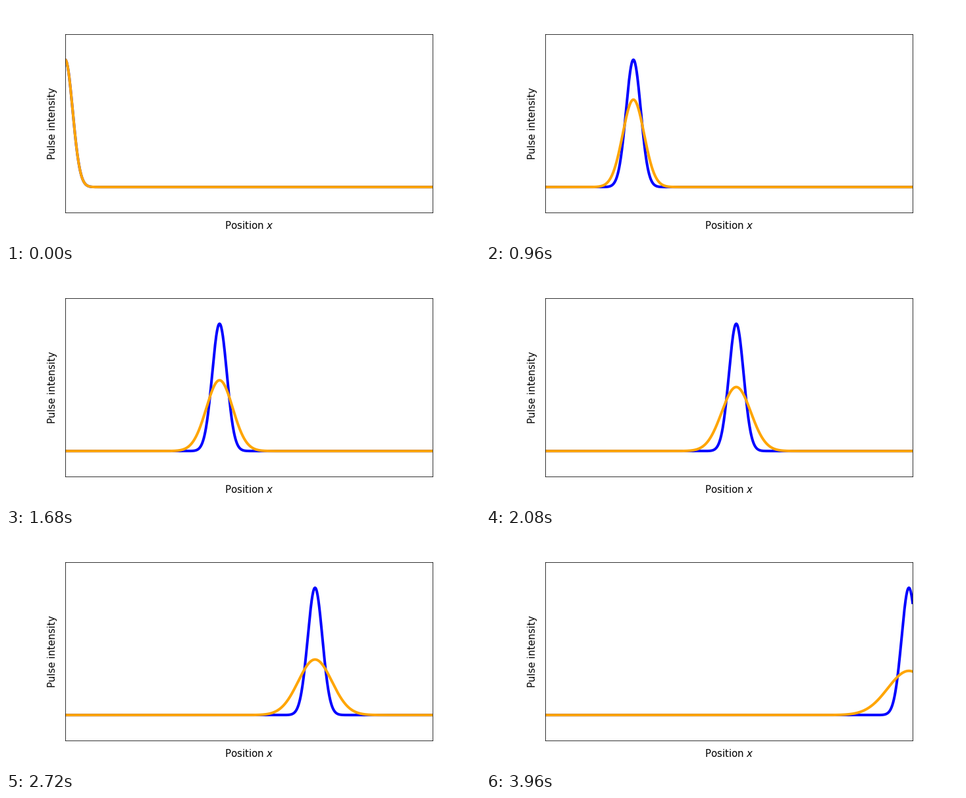
Animation of 720 by 360 pixels, one loop 4 s. Source, as a matplotlib script:

```python
import numpy as np
import matplotlib.pyplot as plt
from matplotlib.animation import FuncAnimation

FRAMES = 100
WIDTH = 2.0      # pulse width, in steps travelled per frame
SPREAD = 0.019   # relative broadening per frame

plt.rcParams["font.family"] = "DejaVu Sans"

fig, ax = plt.subplots(figsize=(10, 5), dpi=72)
fig.subplots_adjust(left=0.125, right=0.9, bottom=0.125, top=0.88)
ax.set_xlim(0, FRAMES)
ax.set_ylim(-0.2, 1.2)
ax.set_xticks([])
ax.set_yticks([])
ax.set_xlabel("Position $x$", fontsize=15, labelpad=12)
ax.set_ylabel("Pulse intensity", fontsize=15, labelpad=12)

x = np.linspace(0, FRAMES, 1001)
steady, = ax.plot([], [], color="blue", lw=4)
dispersed, = ax.plot([], [], color="orange", lw=4)


def pulse(center, stretch):
    """Gaussian of constant area, widened by the factor stretch."""
    return np.exp(-0.5 * ((x - center) / (WIDTH * stretch)) ** 2) / stretch


def update(i):
    steady.set_data(x, pulse(i, 1))
    dispersed.set_data(x, pulse(i, 1 + SPREAD * i))
    return steady, dispersed


anim = FuncAnimation(fig, update, frames=FRAMES, interval=40,
                     repeat=True, repeat_delay=0)
plt.show()
```
